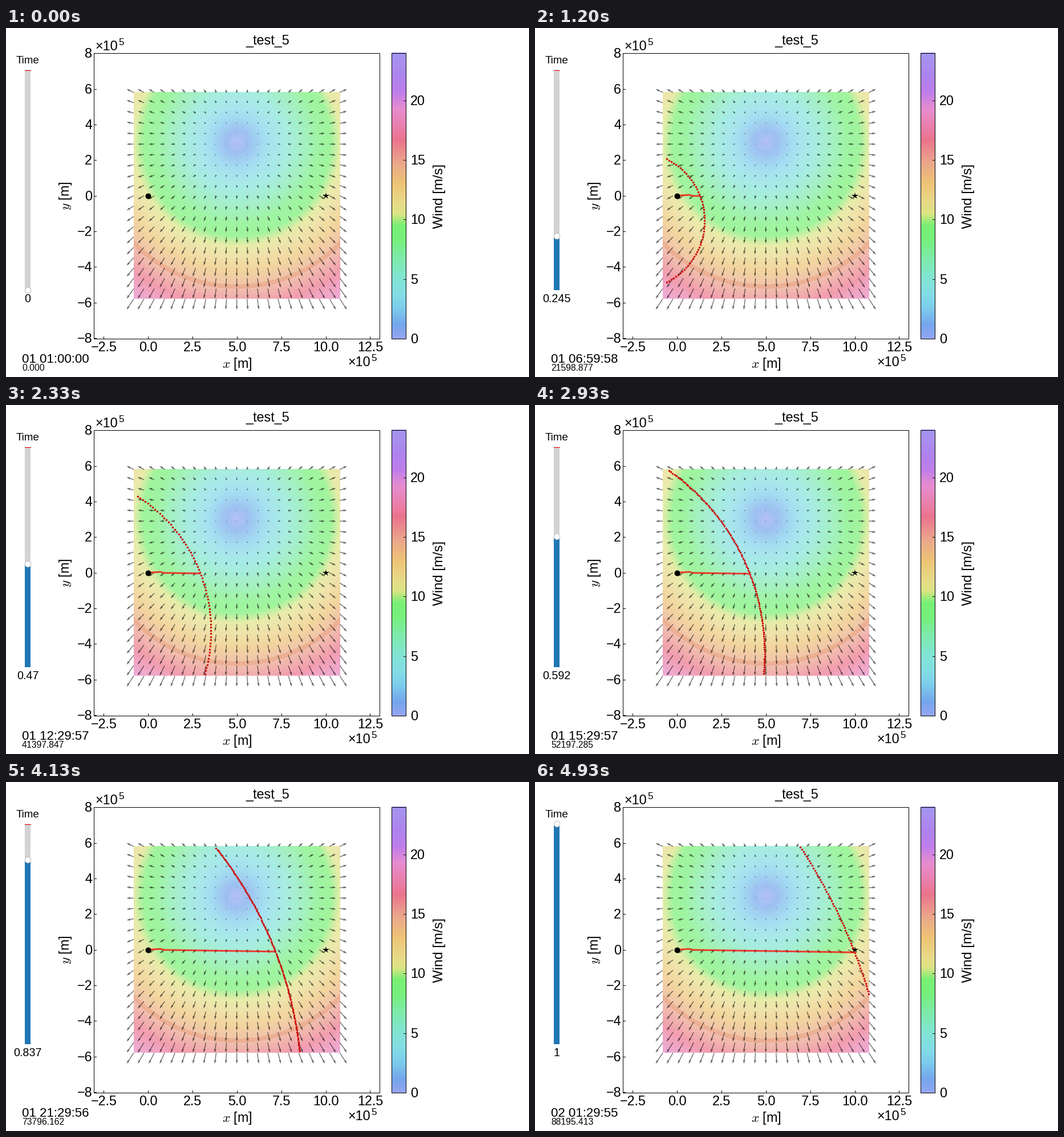
A matplotlib script that plays this animation: 917 by 611 pixels, repeating every 5.06 s.

```python
import numpy as np
import matplotlib.pyplot as plt
from matplotlib.animation import FuncAnimation
from matplotlib.colors import LinearSegmentedColormap
from matplotlib.patches import Rectangle

W, H, DPI = 917, 611, 64
PT = 72 / DPI                      # points per pixel
UNIT, X0, Y0 = 31.17, 248.8, 293.6  # pixels per 1e5 m, pixel position of (0, 0)
HALF = 5.8                         # half side of the wind field
CENTRE = np.array([5.0, 3.0])      # calm point of the outflow
WIND = 1.8e-5                      # wind speed per metre from the calm point
STEPS, STEP_SECONDS = 49, 1799.90638
LOOP, INTERVAL = 5060, 20
SLIDER_TOP, SLIDER_BOTTOM = 73, 458.5
ROUTE = np.array([(0, 0), (0.7, 0.045), (0.88, -0.01), (10, -0.15)])

plt.rcParams.update({"font.family": "Liberation Sans", "mathtext.fontset": "cm"})

SPEED_COLORS = [
    (0, (150, 165, 242)), (1.1, (116, 166, 236)), (2.6, (125, 205, 236)),
    (3.5, (130, 219, 231)), (5, (130, 229, 214)), (6.9, (125, 235, 165)),
    (8.3, (118, 240, 122)), (9.5, (120, 240, 116)), (10.5, (222, 228, 132)),
    (11.5, (232, 217, 136)), (13, (238, 196, 117)), (14.8, (235, 166, 140)),
    (16.7, (235, 115, 140)), (17.5, (235, 125, 165)), (19.3, (231, 140, 208)),
    (20.7, (190, 126, 235)), (22, (175, 131, 238)), (24, (165, 150, 240)),
]
wind_map = LinearSegmentedColormap.from_list(
    "wind", [(v / 24, np.array(c) / 255) for v, c in SPEED_COLORS], N=512)

fig = plt.figure(figsize=(W / DPI, H / DPI), dpi=DPI, facecolor="white")
ax = fig.add_axes([0, 0, 1, 1])


def px(x, y):
    return X0 + UNIT * np.asarray(x), Y0 - UNIT * np.asarray(y)


def reset_stage():
    ax.set(xlim=(0, W), ylim=(H, 0))
    ax.axis("off")


def label(x, y, text, size=23.4, **kw):
    return ax.text(x, y, text, fontsize=size * PT, **kw)


def line(xs, ys, color="black", width=1.0, **kw):
    return ax.plot(xs, ys, color=color, lw=width * PT, **kw)[0]


def frame_box(left, top, right, bottom):
    ax.add_patch(Rectangle((left, top), right - left, bottom - top, fill=False,
                           ec="black", lw=PT, zorder=4))


def draw_wind():
    left, top = px(5 - HALF, HALF)
    right, bottom = px(5 + HALF, -HALF)
    side = np.linspace(-HALF, HALF, 362)
    dist = np.hypot(side[None, :], -side[:, None] - CENTRE[1])
    rgba = wind_map(dist * WIND * 1e5 / 24)
    rgba[..., 3] = np.where(abs(dist - 8.13) < 0.125, 0.91, 0.7)
    ax.imshow(rgba, extent=(left, right, bottom, top), aspect="auto", zorder=1)

    gx, gy = np.meshgrid(np.linspace(5 - HALF, 5 + HALF, 21),
                         np.linspace(-HALF, HALF, 21))
    ax.quiver(*px(gx, gy), 2.13 * (gx - CENTRE[0]), 2.13 * (gy - CENTRE[1]),
              units="dots", scale_units="dots", scale=1, width=1.3,
              color="black", alpha=0.6, zorder=2)


def draw_axes():
    frame_box(154, 44, 655, 544)
    for v in np.arange(-2.5, 13, 2.5):
        x, _ = px(v, 0)
        line([x, x], [544, 540], zorder=4)
        label(x + 0.5, 566, f"{v:.1f}".replace("-", "−"), ha="center")
    for v in range(-8, 9, 2):
        _, y = px(0, v)
        line([154, 158], [y, y], zorder=4)
        label(151, y + 8, str(v).replace("-", "−"), ha="right")
    for x, y in ((156, 39), (599.5, 592)):
        label(x, y, "×10")
        label(x + 41, y - 9, "5", 17)
    label(420, 28.5, "_test_5")
    label(405.5, 595, "$x$ [m]", ha="center")
    label(104, 293.5, "$y$ [m]", ha="center", va="center", rotation=90)


def draw_colorbar():
    ramp = wind_map(np.linspace(1, 0, 500))[:, None, :]
    ax.imshow(ramp, extent=(676, 701.5, 544, 43.5), aspect="auto", zorder=1)
    frame_box(676, 44, 701, 544)
    for v in range(0, 21, 5):
        y = 544 - v * 500.5 / 24
        line([697, 701], [y, y], zorder=4)
        label(709, y + 8, str(v))
    label(760, 294, "Wind [m/s]", 24, ha="center", va="center", rotation=90)


def draw_slider_track():
    label(38, 62, "Time", 18.9, ha="center")
    ax.add_patch(Rectangle((33, SLIDER_TOP), 10, SLIDER_BOTTOM - SLIDER_TOP,
                           fc="lightgrey", lw=0))
    line([33, 43], [SLIDER_TOP + 1] * 2, "red")


draw_wind()
draw_axes()
draw_colorbar()
draw_slider_track()
reset_stage()

# Flatten the still parts so that each frame only redraws what moves.
fig.canvas.draw()
backdrop = np.array(fig.canvas.buffer_rgba())
ax.clear()
ax.imshow(backdrop, extent=(0, W, H, 0), aspect="auto", interpolation="nearest")
reset_stage()

bar = ax.add_patch(Rectangle((33, SLIDER_BOTTOM), 10, 0, fc="#1f77b4", lw=0))
handle = ax.plot([38.3], [SLIDER_BOTTOM], "o", ms=10.5 * PT, mfc="white",
                 mec="0.75", mew=PT, zorder=5)[0]
value_text = label(38, 479.5, "", 19.8, ha="center")
clock_text = label(28, 586.5, "", 22.3)
seconds_text = label(28, 600, "", 15.7)
route = line([], [], "red", 3, alpha=0.75, zorder=3, solid_capstyle="butt")
front = ax.plot([], [], "o", color="#cd0a0a", ms=3.5 * PT, mew=0, zorder=4)[0]
ax.plot(*px([0], [0]), "o", color="black", ms=10 * PT, mew=0, zorder=5)
ax.plot(*px([10], [0]), "*", color="black", ms=12.5 * PT, mew=0, zorder=5)


def reach(step):
    """Centre and radius of the circle a boat can reach in a linear outflow."""
    growth = (1 + WIND * STEP_SECONDS) ** step
    boat_speed = 14.76 + 0.3 * np.exp(-(step / 25) ** 2)
    return CENTRE * (1 - growth), boat_speed * (growth - 1) / WIND / 1e5


def front_points(centre, radius):
    count = 80
    while 2 * np.pi * radius * UNIT / count > 6:
        count *= 2
    angle = np.arange(count) * 2 * np.pi / count
    x = centre[0] + radius * np.cos(angle)
    y = centre[1] + radius * np.sin(angle)
    inside = (x > -0.66) & (x < 10.8) & (abs(y) < 5.75)
    return px(x[inside], y[inside])


def route_points(centre, radius):
    x = y = 0.0
    for _ in range(3):
        x = centre[0] + np.sqrt(max(radius**2 - (y - centre[1])**2, 0))
        y = np.interp(x, *ROUTE.T)
    passed = ROUTE[ROUTE[:, 0] < x]
    return px(np.append(passed[:, 0], x), np.append(passed[:, 1], y))


def slider_format(value):
    digits = next(n for n in range(4) if abs(value - round(value, n)) < 1e-3)
    return f"{value:.{digits}f}"


def step_at(ms):
    # Steps alternate between 130 ms and 70 ms.
    return min(ms // 200 * 2 + (ms % 200 >= 130), STEPS)


def update(i):
    step = step_at(i * INTERVAL + INTERVAL // 2)
    value, seconds = step / STEPS, step * STEP_SECONDS

    y = SLIDER_BOTTOM + value * (SLIDER_TOP - SLIDER_BOTTOM)
    bar.set_y(y)
    bar.set_height(SLIDER_BOTTOM - y)
    handle.set_ydata([y])
    value_text.set_text(slider_format(value))

    total = int(seconds) + 3600
    day, rest = divmod(total, 86400)
    clock_text.set_text(
        f"{day + 1:02d} {rest // 3600:02d}:{rest // 60 % 60:02d}:{rest % 60:02d}")
    seconds_text.set_text(f"{seconds:.3f}")

    if step:
        circle = reach(step)
        front.set_data(*front_points(*circle))
        route.set_data(*route_points(*circle))
    else:
        front.set_data([], [])
        route.set_data([], [])
    return bar, handle, value_text, clock_text, seconds_text, front, route


anim = FuncAnimation(fig, update, frames=LOOP // INTERVAL, interval=INTERVAL,
                     repeat=True, repeat_delay=0)
plt.show()
```
